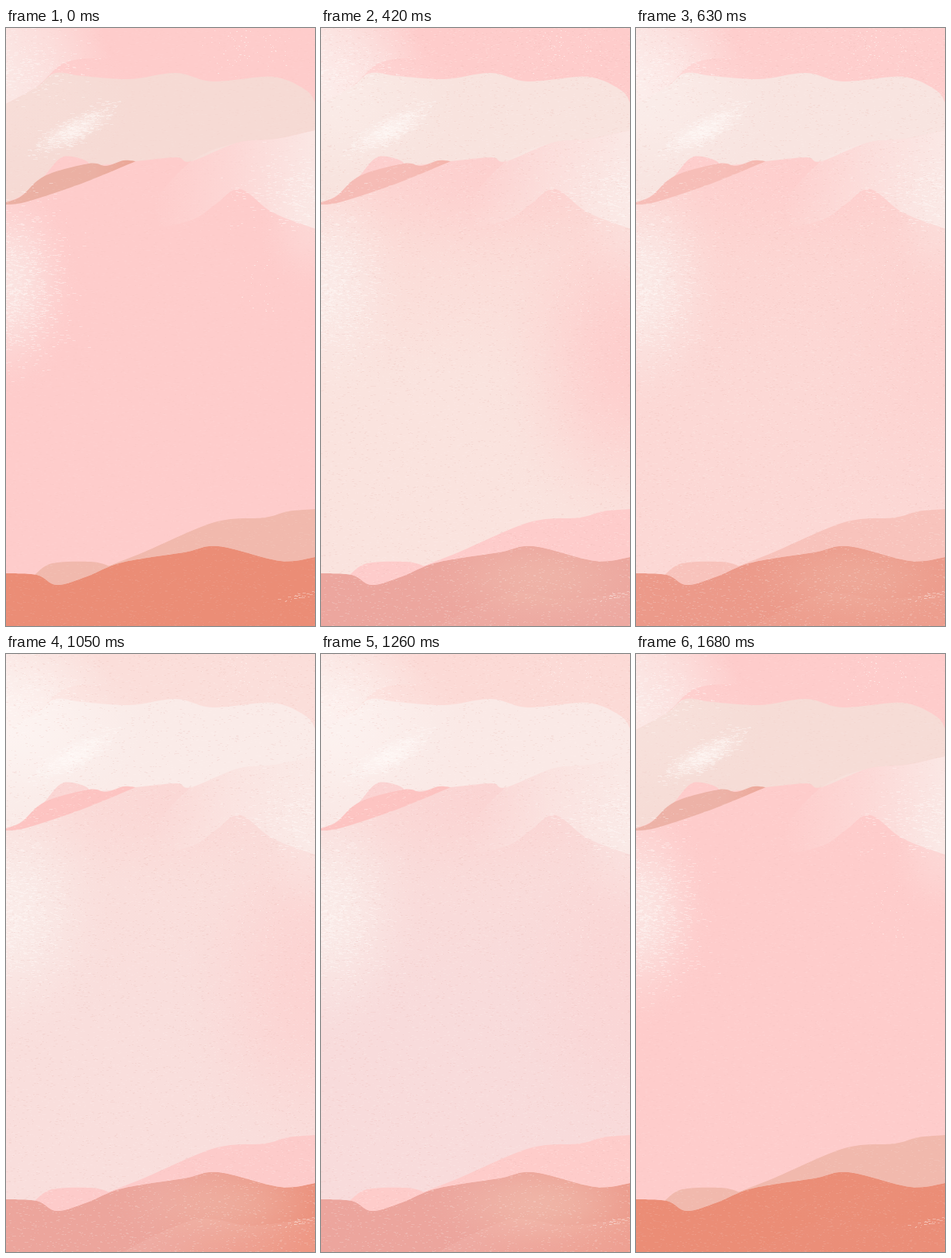
Write an HTML page with a canvas that moves like this. It is 400x772 px and loops after 1890 ms.

```html
<!DOCTYPE html>
<html lang="en">
<head>
<meta charset="utf-8">
<title>Pink hills</title>
<style>
html, body { margin: 0; width: 100%; height: 100%; overflow: hidden; background: #fecccb; }
canvas { display: block; width: 400px; height: 772px; }
</style>
</head>
<body>
<canvas id="stage" width="400" height="772"></canvas>
<script>
const W = 400, H = 772, STEP = 210;
const ctx = document.getElementById('stage').getContext('2d');

const PINK = '#fecccb', CREAM = '#fae3de', LILAC = '#f5dadd', MIST = '#faebe8', WHITE = '#fffaf8';
const CLAY = '#eb8d76', DUSK = '#eca69e', SAND = '#f1b9ad';

// Each mood sets how far the shared colours shift:
// top and body pale the sky, cool turns it lilac, earth fades the hills,
// ember warms the right slope, side keeps the right edge pink, veil whitens the clouds.
const warm = { top: 0, body: 0, cool: 0, earth: 0, ember: 0, side: 0, veil: 0 };
const cream = { ...warm, body: 1, earth: 1, side: .9, veil: .5 };
const rose = { ...warm, top: .2, veil: .65 };
const milk = { top: .8, body: .9, cool: .35, earth: .95, ember: .9, side: .6, veil: 1 };
const mauve = { top: .4, body: .85, cool: .9, earth: 1, ember: 0, side: .1, veil: .8 };
const between = (a, b) => Object.fromEntries(Object.keys(a).map(k => [k, (a[k] + b[k]) / 2]));
const moods = [warm, between(warm, cream), cream, between(cream, rose), rose,
  milk, between(milk, mauve), mauve, { ...warm, veil: .1 }];

const channels = hex => [1, 3, 5].map(i => parseInt(hex.slice(i, i + 2), 16));
const rgba = (hex, alpha) => `rgba(${channels(hex)},${Math.min(1, alpha)})`;
function mix(a, b, t) {
  const end = channels(b);
  return '#' + channels(a).map((v, i) => Math.round(v + (end[i] - v) * t).toString(16).padStart(2, '0')).join('');
}

function seeded(seed) {
  return () => {
    seed = (seed * 1664525 + 1013904223) >>> 0;
    return seed / 4294967296;
  };
}

// Smooth curves through key points, joined end to end and closed.
function shape(...curves) {
  const path = new Path2D();
  curves.forEach((pts, n) => {
    path[n ? 'lineTo' : 'moveTo'](...pts[0]);
    for (let i = 0; i < pts.length - 1; i++) {
      const b = pts[i], c = pts[i + 1], a = pts[i - 1] || b, d = pts[i + 2] || c;
      path.bezierCurveTo(b[0] + (c[0] - a[0]) / 6, b[1] + (c[1] - a[1]) / 6,
        c[0] - (d[0] - b[0]) / 6, c[1] - (d[1] - b[1]) / 6, ...c);
    }
  });
  path.closePath();
  return path;
}
const ground = (pts, base) => shape(pts, [[pts.at(-1)[0], base], [pts[0][0], base]]);

const cloudBase = [[400, 132], [350, 143], [300, 148], [240, 172], [220, 167], [168, 172], [110, 177],
  [75, 166], [50, 191], [20, 216], [0, 225]];
const paths = {
  cloud: shape([[0, 98], [40, 76], [64, 58], [100, 62], [160, 66], [220, 58], [268, 69], [345, 63], [388, 80], [400, 96]], cloudBase),
  wisp: shape([[0, 98], [40, 76], [78, 44], [140, 38]], [[165, 0], [0, 0]]),
  spur: shape([[0, 225], [20, 217], [50, 191], [107, 175], [130, 178], [152, 171], [168, 172]], [[168, 172], [100, 200], [28, 224], [0, 228]]),
  knoll: shape([[50, 191], [75, 166], [107, 176], [50, 191]]),
  haze: shape([[180, 235], [240, 172], [300, 148], [350, 143], [400, 132]], [[400, 259], [345, 238], [303, 208], [272, 227], [245, 246], [205, 257]]),
  farRight: ground([[132, 695], [180, 676], [270, 638], [335, 632], [365, 624], [400, 621]], 720),
  farLeft: ground([[38, 705], [60, 691], [110, 689], [135, 695]], 720),
  near: ground([[0, 704], [40, 706], [66, 719], [105, 708], [150, 690], [230, 677], [275, 669], [355, 688], [400, 683]], H),
  fold: ground([[150, 772], [245, 730], [320, 738], [400, 727]], H)
};

function fill(path, style) {
  ctx.fillStyle = style;
  ctx.fill(path);
}
function gradient(x0, y0, x1, y1, ...stops) {
  const g = ctx.createLinearGradient(x0, y0, x1, y1);
  stops.forEach(([at, color]) => g.addColorStop(at, color));
  return g;
}
function blob(x, y, rx, ry, color, alpha, turn = 0) {
  ctx.save();
  ctx.translate(x, y);
  ctx.rotate(turn);
  ctx.scale(rx, ry);
  const g = ctx.createRadialGradient(0, 0, 0, 0, 0, 1);
  for (let r = 0; r <= 1; r += .125) g.addColorStop(r, rgba(color, alpha * (1 + Math.cos(Math.PI * r)) / 2));
  ctx.fillStyle = g;
  ctx.fillRect(-1, -1, 2, 2);
  ctx.restore();
}

function layer(seed, draw) {
  const c = document.createElement('canvas');
  c.width = W;
  c.height = H;
  draw(c.getContext('2d'), seeded(seed));
  return c;
}
const paper = layer(7, (g, rnd) => {
  for (let i = 0; i < 15000; i++) {
    g.fillStyle = rnd() < .6 ? '#fff6f2' : '#eab8b2';
    g.fillRect(rnd() * W | 0, rnd() * H | 0, 1 + rnd() * 3 | 0, 1);
  }
});
const brush = layer(21, (g, rnd) => {
  const bell = () => rnd() + rnd() + rnd() - 1.5;
  // Marks scattered around a point, their height following the slope.
  const scatter = (count, length, x, y, w, h, slope = 0) => {
    for (let i = 0; i < count; i++) {
      const dx = bell() * w;
      g.fillRect(x + dx | 0, y + dx * slope + bell() * h | 0, 1 + rnd() * length | 0, 1);
    }
  };
  g.fillStyle = 'rgba(255,252,250,.5)';
  scatter(1800, 5, 0, 330, 75, 95);
  scatter(500, 6, 88, 132, 50, 18, -.5);
  scatter(600, 5, 0, 45, 95, 45);
  scatter(660, 5, 400, 210, 95, 45);
  scatter(30, 4, 385, 733, 32, 4, -.2);
  g.fillStyle = 'rgba(255,245,241,.85)';
  scatter(75, 1.4, 318, 30, 50, 27);
  scatter(26, 1.6, 332, 335, 27, 42);
});

function paint({ top, body, cool, earth, ember, side, veil }) {
  const skyTop = mix(PINK, CREAM, top);
  const skyBody = mix(PINK, mix(CREAM, LILAC, cool), body);
  const hill = mix(PINK, skyBody, .5 * top + .15);
  const spur = mix('#ebb0a3', '#fdc4c2', Math.min(1, veil * 1.2));
  const slope = mix(CLAY, DUSK, earth);
  const far = mix(SAND, PINK, earth);

  ctx.globalAlpha = 1;
  ctx.fillStyle = gradient(0, 0, 0, H, [.1, skyTop], [.3, mix(skyTop, skyBody, .55)], [.58, skyBody]);
  ctx.fillRect(0, 0, W, H);
  blob(400, 430, 190, 260, PINK, side);
  blob(210, 190, 230, 120, hill, .8);
  blob(0, 330, 95 + 50 * veil, 150 + 40 * veil, MIST, .75 + .25 * veil);

  fill(paths.wisp, gradient(0, 50, 130, 18, [0, rgba(MIST, .8)], [.5, rgba(MIST, .5)], [1, rgba(MIST, 0)]));
  fill(paths.cloud, mix('#f6dad4', MIST, veil));
  fill(paths.haze, gradient(190, 0, 395, 0, [0, rgba(MIST, 0)], [.5, rgba(MIST, .35 + .2 * veil)], [1, rgba(MIST, .85)]));
  blob(400, 255, 80, 95, MIST, .35);
  blob(0, 95, 200, 130, WHITE, .1 + .45 * veil);
  blob(88, 132, 66, 20, WHITE, .45, -.46);
  fill(paths.knoll, hill);
  fill(paths.spur, gradient(20, 0, 165, 0, [.65, spur], [1, mix(spur, CLAY, .3 * (1 - veil))]));

  fill(paths.farLeft, far);
  fill(paths.farRight, far);
  ctx.save();
  ctx.clip(paths.near);
  fill(paths.near, gradient(200, 690, 400, 730, [0, slope], [1, mix(slope, CLAY, ember)]));
  blob(285, 710, 160, 70, '#f2c4b4', veil * (.25 + .6 * earth) * (1 - ember * .6));
  fill(paths.fold, rgba('#ffd0c8', veil * .12));
  ctx.restore();

  ctx.globalAlpha = .08 + .12 * Math.min(1, veil * 2);
  ctx.drawImage(paper, 0, 0);
  ctx.globalAlpha = .7;
  ctx.drawImage(brush, 0, 0);
}

let shown = -1;
const start = performance.now();
function tick() {
  const step = Math.floor((performance.now() - start) / STEP) % moods.length;
  if (step !== shown) paint(moods[shown = step]);
  requestAnimationFrame(tick);
}
tick();
</script>
</body>
</html>
```
